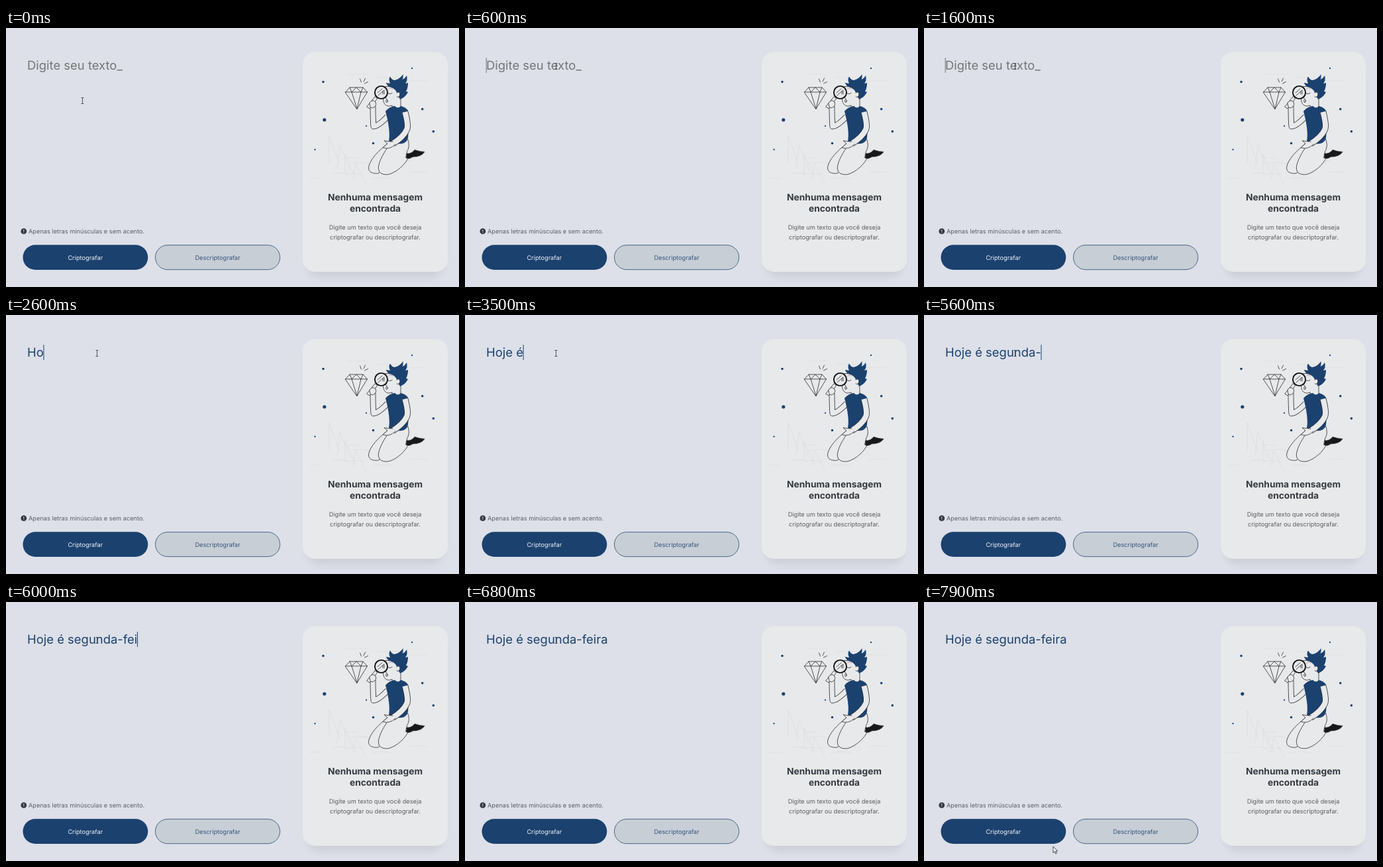
An HTML page that plays this animation: 684 px wide and 392 px high, repeating every 8 s.

```html
<!DOCTYPE html>
<html lang="pt-BR">
<head>
<meta charset="utf-8">
<title>Criptografar texto</title>
<style>
  html, body { margin: 0; width: 100%; height: 100%; overflow: hidden; background: #dde0e8; }
  svg { display: block; width: 684px; height: 392px; font-family: Inter, "Open Sans", sans-serif; text-rendering: geometricPrecision; }
  #typed { font-size: 18.45px; white-space: pre; }
  .small { font-size: 9.23px; }
  .mid { text-anchor: middle; }
  .title { font-size: 13.8px; font-weight: 700; fill: #343a40; }
  .gray { fill: #5a5e64; }
  .navy { fill: #1b416f; }
  .ink { stroke: #2b2b2f; stroke-width: .8; stroke-linejoin: round; stroke-linecap: round; }
  .skin { fill: #e8e9ea; }
  .line { fill: none; }
  .dots { stroke: #1b416f; stroke-linecap: round; }
  #ground { fill: none; stroke: #d9dbde; stroke-width: .7; }
</style>
</head>
<body>
<svg viewBox="0 0 684 392">
  <defs>
    <filter id="blur" x="-20%" y="-20%" width="140%" height="140%"><feGaussianBlur stdDeviation="6.5"/></filter>
  </defs>
  <rect width="684" height="392" fill="#dde0e8"/>

  <text id="typed" x="32" y="63.2"></text>
  <path id="caret" d="M0 45V68" stroke-width="1"/>

  <circle cx="26.8" cy="307.7" r="4.4" fill="#343a40"/>
  <path d="M26.8 305.2V308.3M26.8 309.4V310.4" stroke="#dde0e8"/>
  <text class="small gray" x="34" y="311">Apenas letras minúsculas e sem acento.</text>

  <rect class="navy" x="25.5" y="328.3" width="188.8" height="37.7" rx="18.8"/>
  <text class="small mid" x="119.8" y="350.8" fill="#f0f3f7">Criptografar</text>
  <rect x="225.5" y="328.6" width="188.2" height="37.1" rx="18.5" fill="#c8ced5" stroke="#3b5a84" stroke-width=".9"/>
  <text class="small mid" x="319.6" y="350.8" fill="#34547f">Descriptografar</text>

  <rect x="456" y="54" width="203" height="323" rx="16" opacity=".08" filter="url(#blur)"/>
  <rect x="448" y="36.5" width="219" height="332.5" rx="18.4" fill="#e8e9ea"/>

  <path id="ground"/>
  <path class="dots" stroke-width="5.2" d="M480.8 139h0"/>
  <path class="dots" stroke-width="3.6" d="M479 81.5h0M628.7 122.8h0M645.4 156.6h0M554.5 174.5h0"/>
  <path class="dots" stroke-width="2.3" d="M613 61h0M544 148.3h0M466.5 184h0"/>

  <!-- diamond -->
  <path class="ink line" d="M512.5 97L519 90H539L545.5 97 530 122.5ZH545.5M519 90L522 97 529 90 536 97 539 90M522 97L530 122.5 536 97"/>
  <path class="ink line" d="M534.5 77l2 5M540 81l2.5-5M541.5 84l5-2.5"/>

  <!-- kneeling figure -->
  <g class="ink skin">
    <path d="M579 173C568 181 553 194 548.5 207 545 217 552 221 562 220L590 200Z"/>
    <path d="M580 175C574 184 566 195 563 207 560 219 568 223 578 221.5 590 218 603 207 608 195L605 188C609 181 609 177 607 169Z"/>
    <path d="M605 190Q612 191 617 184.500 624 187 632 187.500 627 195 614 195 609 199 604 196.500Z" fill="#17181b"/>
    <path d="M572 89C570 97 569 103 569.500 108 570 115 574 119 580 118L583 117 584 124 596 122 596 100 584 89Z"/>
  </g>
  <g id="bentArm"></g>
  <path class="navy" d="M573 126Q579 119 587 118 592 123 596 118 604 120 607 125 609 148 607 166 605 174 598 175 586 176 578 171 581 156 573 126Z"/>
  <path class="navy" d="M577 88L573.500 83 580 84Q577 78 580 73.500 583 79 587 79 595 77 599.500 70 600 75 598.500 78 603 76 605 72 607 79 603 84L607 83Q607 91 604 96L607 97Q603 105 595 108L591 101Q589 93 584 91Z"/>
  <g id="longArm"></g>
  <g class="ink skin">
    <path d="M584 172Q577 172 571 170.500L576 175 569 181Q579 185 588 176"/>
    <path d="M590 98c4-3 6 2 4 5-1 2-3 2-4 1"/>
    <path class="line" d="M577 99q3 2 6-.5M575 101l-2 5 2 1"/>
    <ellipse cx="575" cy="110.500" rx="1.300" ry="2.200"/>
    <path d="M557.500 104L560.500 107 549 122 545 119.500Z"/>
    <path d="M549 113q4-4 6-3l3 2q2 4-1 7-5 4-7 0z"/>
  </g>
  <path d="M577 93q4-4 7 0" fill="none" stroke="#c8a6ad"/>
  <circle class="skin" cx="566.500" cy="97.500" r="9.600" stroke="#111" stroke-width="1.900"/>
  <path class="ink line" d="M561 98l7-6M562 102l9-8M569 96v4M571 95v5"/>

  <text class="title mid" x="557.5" y="261">Nenhuma mensagem</text>
  <text class="title mid" x="557.5" y="278.400">encontrada</text>
  <text class="small gray mid" x="557.5" y="305">Digite um texto que você deseja</text>
  <text class="small gray mid" x="557.5" y="320.300">criptografar ou descriptografar.</text>

  <path id="beam" d="M-2-4.500H2M0-4.500V4.500M-2 4.500H2" stroke="#44474c" stroke-width=".9"/>
  <path id="arrow" d="M0 0V9.500L2.200 7.500 3.700 11 5.300 10.300 3.800 7H6.700Z" fill="#f4f5f7" stroke="#22252b" stroke-width=".8"/>
</svg>
<script>
const LOOP = 8000, STEP = 100, BLINK = 520, CLICK = 450;
const PLACEHOLDER = "Digite seu texto_";
// Bursts of typing: text, start, gap between keys
const BURSTS = [["H", 1700, 0], ["o", 2600, 0], ["je ", 2900, 50],
  ["é ", 3500, 100], ["segunda-", 4300, 185], ["feira", 5800, 100]];
const KEYS = BURSTS.flatMap(([text, from, gap]) =>
  [...text].map((char, i) => ({ char, time: from + i * gap })));

const byId = id => document.getElementById(id);
const typed = byId("typed"), caret = byId("caret"), beam = byId("beam"), arrow = byId("arrow");

const show = (el, on) => el.setAttribute("visibility", on ? "visible" : "hidden");
const move = (el, x, y) => el.setAttribute("transform", `translate(${x} ${y})`);
const progress = (t, from, to) => Math.min(1, Math.max(0, (t - from) / (to - from)));
const mix = (a, b, k) => a + (b - a) * k;
const bezier = (a, b, c, d, k) => {
  const n = 1 - k;
  return n * n * n * a + 3 * n * n * k * b + 3 * n * k * k * c + k * k * k * d;
};

// An outlined limb: a dark stroke with a lighter one on top
function limb(id, d, width) {
  const stroke = (color, w) => `<path d="${d}" fill="none" stroke="${color}" stroke-width="${w}" stroke-linejoin="round"/>`;
  byId(id).innerHTML = stroke("#2b2b2f", width + .8) + stroke("#e8e9ea", width - .8);
}

function sketchGround() {
  let seed = 7, d = "";
  const random = () => (seed = seed * 16807 % 2147483647) / 2147483647;
  for (let i = 0; i < 12; i++) {
    const x = 458 + random() * 165, y = 192 + random() * 40, w = 14 + random() * 18;
    d += `M${x} ${y}q${w / 2}-4 ${w} 0`;
  }
  for (let i = 0; i < 4; i++) {
    d += `M${488 + i * 12} ${205 + i * 8}l${i % 2 * 4}-${42 - i * 6} 16 ${44 - i * 4}`;
  }
  for (let i = 0; i < 3; i++) d += `M${515 + i * 45} ${70 + i * 5}h32`;
  byId("ground").setAttribute("d", d);
}

// Glides to the field and clicks, then swings round to the button
function pointer(t) {
  const enter = progress(t, 100, 500), leave = progress(t, 7200, 7900);
  if (leave > 0) return [bezier(137.5, 430, 560, 195, leave), bezier(58, -60, 340, 370, leave)];
  return [mix(115.5, 137.5, enter), mix(110, 58, enter)];
}

function draw(time) {
  const t = Math.floor(time / STEP) * STEP;
  const done = KEYS.filter(key => key.time <= t);
  const color = done.length ? "#1b416f" : "#757575";

  typed.textContent = done.map(key => key.char).join("");
  const end = done.length ? typed.getComputedTextLength() : 0;
  if (!done.length) typed.textContent = PLACEHOLDER;
  typed.setAttribute("fill", color);

  const last = done.length ? done[done.length - 1].time : CLICK;
  show(caret, t >= CLICK && Math.floor((t - last) / BLINK) % 2 === 0);
  caret.setAttribute("stroke", color);
  move(caret, 32.2 + end, 0);

  const [x, y] = pointer(t);
  const overText = y < 295;
  show(beam, overText);
  show(arrow, !overText);
  move(beam, x, y);
  move(arrow, x, y);
}

limb("bentArm", "M554 118Q554 140 555 149 563 148 576 134", 8);
limb("longArm", "M602.5 127Q608 148 605 154 600 165 584 175", 9);
sketchGround();

const start = performance.now();
function tick() {
  draw((performance.now() - start) % LOOP);
  requestAnimationFrame(tick);
}
draw(0);
requestAnimationFrame(tick);
</script>
</body>
</html>
```
